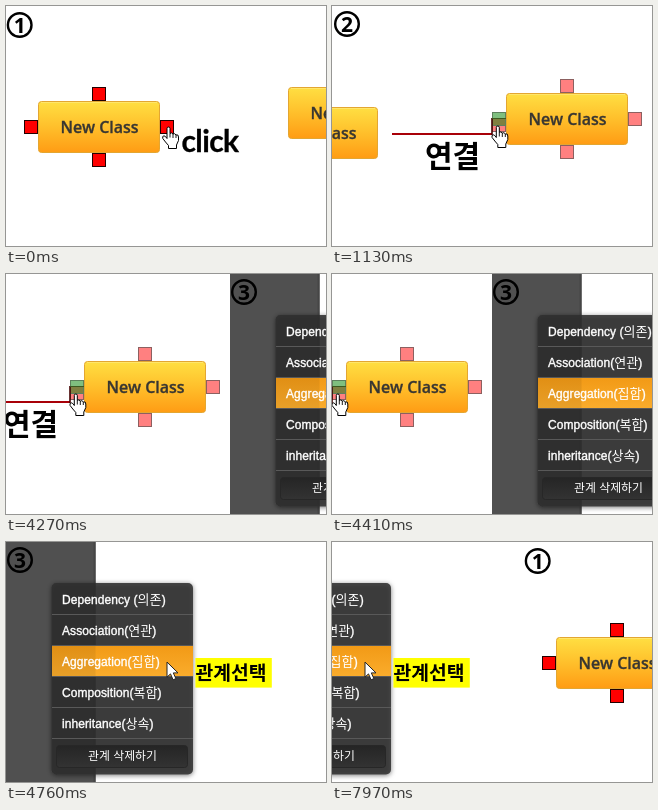
An HTML page for the animation above (8000 ms loop, 320 by 240 pixels).

```html
<!DOCTYPE html>
<html lang="ko">
<head>
<meta charset="utf-8">
<title>Class relation guide</title>
<style>
html, body { margin: 0; width: 100%; height: 100%; overflow: hidden; background: #fff; }
#stage { display: block; width: 100%; height: 100%; }
text { font-family: "Noto Sans CJK KR", "Noto Sans CJK", sans-serif; }
.num { font: bold 21px "Open Sans", sans-serif; text-anchor: middle; }
.name { font: 600 16px "Open Sans", sans-serif; fill: #383632; stroke: #383632; stroke-width: .3; }
.click { font: 700 30px Lato, sans-serif; letter-spacing: -.6px; stroke: #000; stroke-width: .3; }
.bold { font-weight: 700; }
.item { font: 12px "Liberation Sans", Arial, sans-serif; letter-spacing: .07px; fill: #fff; stroke: #fff; stroke-width: .4; }
.item tspan { font: 13px "Noto Sans CJK KR", "Noto Sans CJK", sans-serif; stroke: none; }
</style>
</head>
<body>
<svg id="stage" viewBox="0 0 320 240">
  <defs>
    <linearGradient id="gold" x2="0" y2="1">
      <stop stop-color="#ffdf42"/>
      <stop offset=".5" stop-color="#ffbf2b"/>
      <stop offset="1" stop-color="#ff9c14"/>
    </linearGradient>
    <linearGradient id="amber" x2="0" y2="1">
      <stop stop-color="#f29a16"/>
      <stop offset="1" stop-color="#faac2c"/>
    </linearGradient>
    <linearGradient id="dark" x2="0" y2="1">
      <stop stop-color="#252525"/>
      <stop offset="1" stop-color="#333"/>
    </linearGradient>
    <filter id="shadow" x="-10%" y="-10%" width="120%" height="120%">
      <feDropShadow dx="0" dy="1" stdDeviation="2.8" flood-opacity=".6"/>
    </filter>
  </defs>
  <g id="strip"></g>
</svg>
<script>
const WIDTH = 320, LOOP = 8000, STEP_MS = 70, STEPS = 10;
const SLIDES = [500, 4130, 7760];

const rect = (x, y, w, h, fill, extra = '') =>
  `<rect x="${x}" y="${y}" width="${w}" height="${h}" fill="${fill}" ${extra}/>`;
const text = (x, y, cls, body, extra = '') =>
  `<text x="${x}" y="${y}" class="${cls}" ${extra}>${body}</text>`;
const path = (d, stroke, width, fill = 'none') =>
  `<path d="${d}" fill="${fill}" stroke="${stroke}" stroke-width="${width}"/>`;

const badge = (n, x, y) =>
  `<circle cx="${x}" cy="${y}" r="11.8" fill="none" stroke="#000" stroke-width="2.4"/>` +
  text(x, y + 7.5, 'num', n);

const classBox = (x, y) =>
  rect(x + .5, y + .5, 121, 51, 'url(#gold)', 'rx="3" stroke="#e3a632"') +
  path(`M${x + 3} ${y + 1.5}h116`, '#ffe66a', 1) +
  text(x + 22.5, y + 32, 'name', 'New Class');

const port = (x, y, fill, stroke) =>
  rect(x + .5, y + .5, 13, 13, fill, `stroke="${stroke}"`);

// Ports sit on the middle of each side of a class box.
const ports = (x, y, fill, stroke, sides) =>
  [[54, -14], [122, 19], [54, 52], [-14, 19]].slice(0, sides)
    .map(([dx, dy]) => port(x + dx, y + dy, fill, stroke)).join('');

const hand = (x, y) => `<g transform="translate(${x} ${y})">` +
  path('M5 12V2Q5 .5 6.5 .5T8 2V7Q9.5 5.5 11 7.5Q12.7 6.4 14 8.4Q16.5 7.6 16.5 10.5V14L14.5 18.5V22H6.5V19L3.5 15.5 .8 12Q0 9.5 2 9.3Q3.5 9.5 5 12Z', '#000', 1, '#fff') +
  path('M8 7v4M11 7.5v4M14 8.5v3', '#000', .9) + '</g>';

const arrow = (x, y) => `<g transform="translate(${x} ${y})">` +
  path('M.5 .5V15.5L4 12.3 6.6 18.2 9.4 17 6.8 11.3H11.5Z', '#222', 1, '#fff') + '</g>';

const panel = (i, body) =>
  `<svg x="${i * WIDTH}" width="320" height="240" overflow="hidden">${rect(0, 0, 320, 240, '#fff')}${body}</svg>`;

const clickPanel =
  badge(1, 13.7, 19) +
  classBox(32, 95) + ports(32, 95, '#f00', '#200', 4) +
  classBox(282, 81) +
  hand(156, 120.5) +
  text(175.5, 146, 'click', 'click');

const linkPanel =
  badge(2, 15, 18) +
  classBox(-76, 101) + classBox(174, 87) +
  ports(174, 87, '#ff8080', '#8c6060', 3) +
  port(160, 112, '#ff8080', '#8c6060') +
  rect(160.5, 106.5, 13, 13, '#008000', 'fill-opacity=".5" stroke="#5d805d"') +
  path('M60 128H160', '#a80008', 2) +
  path('M160 129V112', '#400', 1.6) +
  path('M160 112.5H174', '#3c5a20', 1) +
  hand(159.3, 119.5) +
  text(93, 161, 'bold', '연결', 'font-size="30"');

const relations = [['Dependency ', '의존'], ['Association', '연관'], ['Aggregation', '집합'],
  ['Composition', '복합'], ['inheritance', '상속']];

const menu =
  rect(45.5, 41, 141.5, 191.5, '#2d2d2d', 'rx="5" fill-opacity=".86" filter="url(#shadow)"') +
  relations.map(([en, ko], i) => {
    const y = 41 + 31 * i;
    const chosen = rect(46, y + 1, 141, 30, 'url(#amber)') +
      rect(46, y + 1, 43.5, 30, '#000', 'fill-opacity=".07"');
    return (i === 2 ? chosen : '') +
      path(`M46 ${y + 31.5}h141`, '#595959', 1) +
      text(56, y + 21, 'item', `${en}(<tspan>${ko}</tspan>)`);
  }).join('') +
  rect(50.5, 203.5, 131, 22, 'url(#dark)', 'rx="3" stroke="#272727"') +
  text(116.5, 218.2, '', '관계 삭제하기', 'font-size="11.9" fill="#fff" text-anchor="middle"');

const choosePanel =
  rect(0, 0, 89.6, 240, '#505050') +
  rect(87.5, 0, 2, 240, '#464646') +
  badge(3, 14, 18) +
  menu +
  rect(189.4, 116, 76.4, 29.6, '#ff0') +
  text(189.5, 138, 'bold', '관계선택', 'font-size="19.3"') +
  arrow(160.5, 119.6);

const strip = document.getElementById('strip');
strip.innerHTML = [clickPanel, linkPanel, choosePanel, clickPanel]
  .map((body, i) => panel(i, body)).join('');

// Each slide jumps a tenth of the width at a time, the first jump at its start.
const stepsDone = (t, start) =>
  Math.max(0, Math.min(STEPS, Math.floor((t - start) / STEP_MS) + 1));

function draw(t) {
  const steps = SLIDES.reduce((sum, start) => sum + stepsDone(t, start), 0);
  strip.setAttribute('transform', `translate(${-steps * WIDTH / STEPS} 0)`);
}

let origin;
function tick(now) {
  origin ??= now;
  draw((now - origin) % LOOP);
  requestAnimationFrame(tick);
}
draw(0);
requestAnimationFrame(tick);
</script>
</body>
</html>
```
